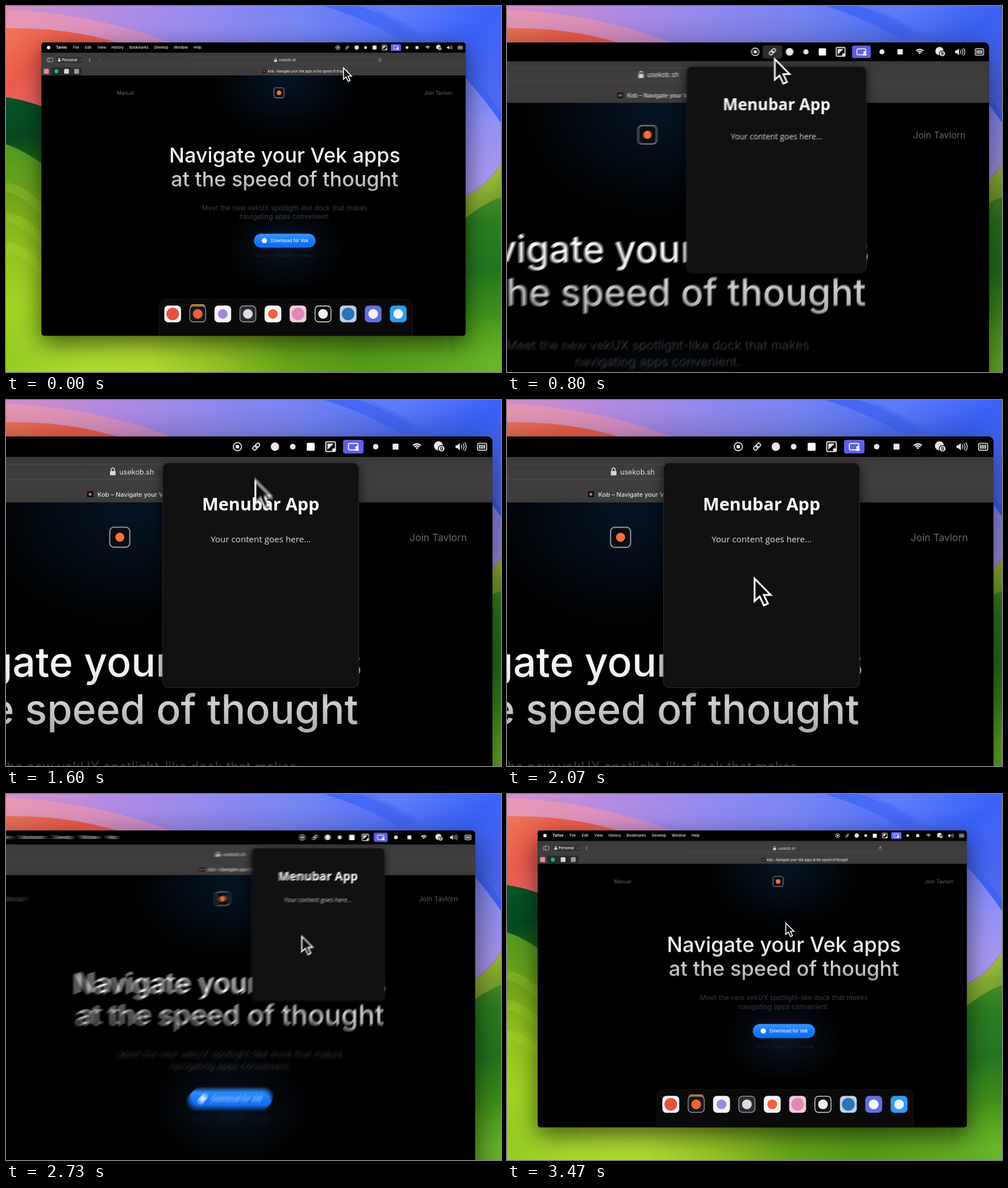
An HTML page with a canvas that plays this animation: 871x643 px, repeating every 3540 ms.

```html
<!DOCTYPE html>
<html lang="en">
<head>
<meta charset="utf-8">
<title>Menubar App</title>
<style>
html, body { margin: 0; width: 100%; height: 100%; overflow: hidden; background: #000; }
canvas { display: block; width: 871px; height: 643px; }
</style>
</head>
<body>
<canvas id="stage" width="871" height="643"></canvas>
<script>
const W = 871, H = 643, LOOP = 3540, FPS = 15;
const SHUTTER = 17, SAMPLES = 8;
const FOCUS = { x: 761, y: 64 };
const UI = 'Inter, sans-serif', POPUP = '"Open Sans", sans-serif';

const stage = document.getElementById('stage').getContext('2d');
const makeLayer = () => Object.assign(document.createElement('canvas'), { width: W, height: H }).getContext('2d');
const layer = makeLayer();
let g = makeLayer();

// ---------- drawing helpers ----------
function ramp(x0, y0, x1, y1, ...colors) {
  const grad = g.createLinearGradient(x0, y0, x1, y1);
  colors.forEach((c, i) => grad.addColorStop(i / (colors.length - 1), c));
  return grad;
}
function glow(x, y, r, color, squash = 1) {
  g.save();
  g.translate(x, y);
  g.scale(1, squash);
  const grad = g.createRadialGradient(0, 0, 0, 0, 0, r);
  grad.addColorStop(0, color);
  grad.addColorStop(1, color.slice(0, 7) + '00');
  g.fillStyle = grad;
  g.fillRect(-r, -r, 2 * r, 2 * r);
  g.restore();
}
function box(x, y, w, h, r, fill, stroke, line = 0.6) {
  g.beginPath();
  g.roundRect(x, y, w, h, r);
  if (fill) { g.fillStyle = fill; g.fill(); }
  if (stroke) { g.strokeStyle = stroke; g.lineWidth = line; g.stroke(); }
}
function dot(x, y, r, fill, stroke, line = 0.9) {
  g.beginPath();
  g.arc(x, y, r, 0, 7);
  if (fill) { g.fillStyle = fill; g.fill(); }
  if (stroke) { g.strokeStyle = stroke; g.lineWidth = line; g.stroke(); }
}
function shape(d, fill, stroke, line = 1) {
  const p = new Path2D(d);
  if (fill) { g.fillStyle = fill; g.fill(p); }
  if (stroke) { g.strokeStyle = stroke; g.lineWidth = line; g.stroke(p); }
}
function text(str, x, y, size, color, { weight = 400, align = 'left', family = UI } = {}) {
  g.font = `${weight} ${size}px ${family}`;
  g.textAlign = align;
  g.fillStyle = color;
  g.fillText(str, x, y);
}
function at(x, y, draw) {
  g.save();
  g.translate(x, y);
  draw();
  g.restore();
}

// ---------- motion ----------
// Monotone cubic through [time, value] keys.
function track(keys) {
  const last = keys.length - 1;
  const slope = i => (keys[i + 1][1] - keys[i][1]) / (keys[i + 1][0] - keys[i][0]);
  const tangent = i => {
    if (i === 0 || i === last) return 0;
    const a = slope(i - 1), b = slope(i);
    return a * b <= 0 ? 0 : 2 * a * b / (a + b);
  };
  return t => {
    if (t <= keys[0][0]) return keys[0][1];
    if (t >= keys[last][0]) return keys[last][1];
    const i = keys.findIndex(k => k[0] > t) - 1;
    const span = keys[i + 1][0] - keys[i][0], u = (t - keys[i][0]) / span, v = 1 - u;
    return v * v * (1 + 2 * u) * keys[i][1] + u * u * (3 - 2 * u) * keys[i + 1][1]
      + span * u * v * (v * tangent(i) - u * tangent(i + 1));
  };
}
const spring = u => u <= 0 ? 1 : (1 + u) * Math.exp(-u);
const release = track([[2399, 0], [2470, 0.46], [3000, 3.89], [3470, 6.45], [3540, 6.8]]);
const zoomAt = t => t < 2399 ? 2 - spring((t - 340) * 0.007) : 1 + spring(release(t));
const cursorX = track([[0, 593], [330, 599], [600, 602], [1470, 602], [1600, 599], [2000, 597.5],
  [2470, 597.5], [2740, 582], [3000, 524], [3260, 493]]);
const cursorY = track([[0, 107], [330, 94], [600, 78.2], [1470, 78.2], [1600, 101], [1900, 180],
  [2200, 189], [2470, 189], [3000, 215], [3300, 223]]);
const toolShift = track([[70, 0], [330, 6.5], [1000, 6.5], [1100, 0]]);
const dockDrop = track([[0, 1], [330, 0], [2900, 0], [3470, 0.5], [3540, 1]]);
const popupOpen = t => t >= 660 && t < 3200;

// ---------- wallpaper ----------
function paintWallpaper() {
  g.fillStyle = ramp(0, 30, W, 0, '#d58fca', '#b58be0', '#948af0', '#7584f5', '#4b70f8', '#3c62f4');
  g.fillRect(0, 0, W, H);
  shape('M620 0 Q760 45 871 205 V400 H780 V140 Q720 50 560 0Z',
    ramp(800, 40, 830, 290, '#4669f6', '#6f80f4', '#9190f4', '#a596ee'));
  shape('M640 0 H871 V190 Q800 70 640 0Z', ramp(700, 0, 860, 170, '#5e7dfa', '#3a62f8', '#5068ef'));
  shape('M0 7 Q170 12 330 80 L200 130 H0Z', ramp(0, 20, 300, 70, '#e898b4', '#dd92bf', '#c58bd5'));
  shape('M0 39 Q130 37 230 76 L150 220 H0Z', ramp(0, 40, 90, 175, '#f0755a', '#ec5c4b', '#ee6670'));

  g.fillStyle = ramp(0, 0, W, 0, '#93cb24', '#aadb2d', '#b0da32', '#92c225', '#66a618', '#559c16', '#5ea61e', '#69b62b');
  g.fillRect(0, 420, W, H - 420);
  shape('M0 160 Q45 166 110 196 V420 H0Z', ramp(0, 160, 30, 300, '#075428', '#064a20', '#286c12'));
  shape('M0 243 Q60 262 130 340 V643 H0Z',
    ramp(0, 245, 10, 620, '#4f9a20', '#71a51a', '#94c421', '#a2d426', '#9bd12600'));
  for (let i = 0; i < 3; i++) {
    const y = 318 + i * 52;
    shape(`M0 ${y} Q45 ${y + 8} 85 ${y + 70}`, null, '#bfe5402e', 16);
  }
  shape('M780 345 Q842 325 871 276 V643 H780Z',
    ramp(830, 300, 836, 625, '#5a962a', '#2b7d20', '#257520', '#41921b', '#56a01b00'));
  shape('M780 345 Q842 325 871 276 V336 Q840 345 780 395Z', ramp(820, 315, 850, 360, '#9cbc3a', '#6d9c2a'));
  shape('M790 341 Q842 325 871 276', null, '#c36bc0', 1.4);
  return g.canvas;
}
const wallpaper = paintWallpaper();
g = layer;

// ---------- window parts ----------
function menuBar(hot) {
  g.fillStyle = '#000';
  g.fillRect(62, 64, 748, 18);
  dot(75, 73, 3, '#eee');
  text('Tarivo', 88, 75.2, 6.3, '#fff', { weight: 700 });
  const menus = [['File', 118], ['Edit', 139], ['View', 161], ['History', 185.5], ['Bookmarks', 217],
    ['Develop', 261], ['Window', 295.5], ['Help', 330]];
  for (const [label, x] of menus) text(label, x, 75.2, 6.3, '#eee', { weight: 500 });

  const ink = '#e6e6e6';
  if (hot) box(591, 66.7, 19, 12.6, 2, '#2c2c2c');
  at(584, 73, () => { dot(0, 0, 3.6, null, ink); box(-1.5, -1.5, 3, 3, 0.5, ink); });
  at(600.5, 73, () => {
    g.rotate(-0.8);
    box(-3.6, -1.5, 4.2, 3, 1.5, null, ink, 0.9);
    box(-0.6, -1.5, 4.2, 3, 1.5, null, ink, 0.9);
  });
  dot(617, 73, 3.7, ink);
  dot(632.7, 73, 2.5, ink);
  box(645, 69.6, 7, 7, 1, '#fff');
  at(666, 73, () => {
    box(-4.2, -4.2, 8.4, 8.4, 1, null, ink, 1);
    shape('M-2.8 2.8V-2.8H2.8Z', ink);
    dot(3, 3, 1.6, ink);
  });
  box(677, 67, 18, 12, 2, '#5f60e6');
  at(686, 73, () => {
    box(-4.3, -2.8, 8.4, 5.6, 0.8, null, '#fff', 0.8);
    dot(3, 0.6, 1.2, '#fff');
    box(1.1, 1.8, 3.9, 1.8, 0.9, '#fff');
  });
  dot(705.7, 73, 2.4, ink);
  box(720.6, 70.4, 5.2, 5.2, 0.6, ink);
  at(742, 75.4, () => {
    for (const r of [1.2, 3, 4.8]) {
      g.beginPath();
      g.arc(0, 0, r, -2.36, -0.78);
      g.strokeStyle = ink;
      g.lineWidth = 1.2;
      g.stroke();
    }
  });
  dot(761, 72.3, 4, ink);
  dot(763.7, 74.7, 2.9, ink, '#000', 0.6);
  text('9', 763.7, 76.3, 4.5, '#111', { weight: 600, align: 'center' });
  shape('M776 71.7h1.6l2.2-2v6.6l-2.2-2h-1.6z', ink);
  shape('M781 71.3q1.2 1.7 0 3.4M782.5 70.2q2 2.8 0 5.6M784 69.2q2.8 3.8 0 7.6', null, ink, 0.7);
  box(795.4, 70, 8, 6.2, 1.2, null, ink, 0.8);
  for (let i = 0; i < 4; i++) box(796.6 + i * 1.5, 71.3, 1, 3.6, 0, ink);
}

function toolbar(shift) {
  g.fillStyle = ramp(0, 82, 0, 122, '#3b393a', '#403e3f', '#3c3a3b');
  g.fillRect(62, 82, 748, 40);
  shape('M320 88.5H662M320 101.7H662', null, '#4c4a4b', 0.6);
  at(shift, 0, () => {
    box(72.5, 91.4, 9.5, 6.6, 1.2, null, '#c8c8c8', 0.8);
    shape('M75.8 91.4V98', null, '#c8c8c8', 0.8);
    box(87.5, 88.2, 48, 13, 2.5, '#343233', '#5a5859');
    dot(93.7, 92.8, 1.4, '#eee');
    box(91.2, 94.6, 5, 2.8, 1.3, '#eee');
    text('Personal', 98.5, 97, 6.3, '#eee', { weight: 600 });
    shape('M129.3 94l1.7 1.6 1.7-1.6', null, '#999', 0.7);
    shape('M148.8 91.6l-3 3.2 3 3.2', null, '#ccc', 0.9);
    shape('M163.6 91.6l3 3.2-3 3.2', null, '#636162', 0.9);
  });
  box(79.8, 108, 53.4, 13.5, 0, '#2a292a');
  shape('M97.5 108v13.5M115.5 108v13.5', null, '#3c3a3b', 0.6);
  box(66.5, 110.2, 9, 9, 1.5, '#ee8c86');
  dot(88.7, 114.7, 3.6, '#22b486');
  box(102.3, 110.5, 8.4, 8.4, 1.5, '#d4d5dc');
  box(120, 110.5, 8.4, 8.4, 1.5, '#999ba3');

  box(471.8, 94.4, 5, 3.8, 0.7, '#d8d8d8');
  shape('M472.9 94.4v-1.2a1.4 1.5 0 0 1 2.8 0v1.2', null, '#d8d8d8', 0.8);
  text('usekob.sh', 480, 97.4, 6.3, '#e2e2e2');
  g.beginPath();
  g.arc(657.8, 95.3, 2.5, -0.6, 4.8);
  g.strokeStyle = '#bbb';
  g.lineWidth = 0.7;
  g.stroke();
  shape('M657.5 91.5l2.3 1.3-2.1 1.5z', '#bbb');
  box(451.2, 111.6, 6.3, 6.3, 1, '#141414', '#555', 0.4);
  dot(454.3, 114.8, 1.3, '#c86c4c');
  text('Kob – Navigate your Vek apps at the speed of thought', 460.8, 117, 5.5, '#e2e2e2', { weight: 500 });
}

function page() {
  g.fillStyle = '#000';
  g.fillRect(62, 122, 748, 460);
  g.save();
  g.beginPath();
  g.rect(62, 122, 748, 458);
  g.clip();
  glow(490, 135, 140, '#05142688', 0.75);
  glow(490, 130, 120, '#061628bb', 0.72);
  glow(490, 424, 105, '#0b1728dd', 0.75);
  g.restore();

  text('Manual', 195, 156, 8.7, '#67676b');
  text('Join Tavlorn', 786, 156, 8.7, '#67676b', { align: 'right' });
  box(471.6, 143.8, 17.6, 17.6, 3.6, '#0b0d10', '#8d8f92', 1.1);
  dot(480.4, 152.6, 4, '#f2713f');

  const mid = { align: 'center' };
  const title = { align: 'center', weight: 500 };
  const fade = ramp(0, 247, 0, 326, '#fff', '#eee', '#cdcdcd', '#a8a8a8');
  text('Navigate your Vek apps', 490.4, 275, 35.9, fade, title);
  text('at the speed of thought', 490.4, 316.5, 35.9, fade, title);
  text('Meet the new vekUX spotlight-like dock that makes', 490.4, 358.6, 12, '#383a41', mid);
  text('navigating apps convenient.', 490.4, 374.4, 12, '#383a41', mid);

  g.save();
  g.shadowColor = '#1677ff44';
  g.shadowBlur = 6;
  box(436.6, 400.2, 107.8, 24, 12, ramp(0, 400, 0, 424, '#3c96ff', '#1a7bfb', '#1069ee'));
  g.restore();
  box(437.1, 400.7, 106.8, 23, 11.5, null, '#4ba0ff88', 0.8);
  dot(454.6, 412.2, 4.6, '#fff');
  text('Download for Vek', 466, 415, 7.8, '#eaf3ff', { weight: 500 });
  text('v0.0.22  |  vekUX 12+  |  manual', 490.6, 441.4, 6.8, '#24272c', mid);
}

const WHITE = '#f4f4f5';
const apps = [
  [WHITE, '#e9503f'], ['#17181b', '#ef6232'], [WHITE, '#a487dd'], ['#2b2b32', '#dcdce2'], [WHITE, '#f0623e'],
  ['#f5c9de', '#e08bb5'], ['#0b0b0c', '#f0f0f0'], ['#b9d2e8', '#2d72b4'], ['#6470df', '#f4f5ff'], ['#2d9df6', '#f0f6fc']
];
function dock(drop) {
  at(-drop, 3 * drop, () => {
    box(270, 512, 446, 90, 13, '#0a0a0b', '#1b1b1d', 0.9);
    apps.forEach(([tile, mark], i) => {
      const x = 294.3 + i * 44.1, y = 538;
      if (i === 1) {
        box(x - 12, y - 17, 24, 8, 3, '#e5b13c');
        box(x - 13.5, y - 16, 27, 8, 4, '#e44e38');
      }
      box(x - 14.7, y - 14.7, 29.4, 29.4, 6.8, tile);
      if (i === 1 || i === 3 || i === 6) box(x - 14, y - 14, 28, 28, 6.2, null, i === 6 ? '#eee' : '#a5a1a0', 1.3);
      dot(x, y, i === 0 || i === 5 || i === 7 ? 11 : 8.5, mark);
    });
  });
}

function popup(scale) {
  g.save();
  g.shadowColor = '#000a';
  g.shadowBlur = 10 * scale;
  g.shadowOffsetY = 3 * scale;
  box(518, 87, 173, 198, 5.5, '#111112');
  g.restore();
  box(518.2, 87.2, 172.6, 197.6, 5.3, null, '#303032', 0.5);
  text('Menubar App', 604.5, 129, 15.3, '#fff', { weight: 700, align: 'center', family: POPUP });
  text('Your content goes here...', 604.5, 157, 7.6, '#dedede', { align: 'center', family: POPUP });
}

function cursor(x, y) {
  at(x, y, () => {
    g.lineJoin = 'miter';
    shape('M.8 1.8V21.6L5.3 17.5 9 25.4 12.5 23.8 8.9 16.2H15Z', '#0c0c0c', '#fff', 1.6);
  });
}

function scene(t) {
  const s = zoomAt(t), open = popupOpen(t), cx = cursorX(t), cy = cursorY(t);
  g.drawImage(wallpaper, 0, 0);
  g.save();
  g.translate(FOCUS.x, FOCUS.y);
  g.scale(s, s);
  g.translate(-FOCUS.x, -FOCUS.y);

  g.save();
  g.shadowColor = 'rgba(0,0,0,.6)';
  g.shadowBlur = 42 * s;
  g.shadowOffsetY = 13 * s;
  box(62.5, 64, 746, 515.3, 4.6, '#000');
  g.restore();

  g.save();
  g.beginPath();
  g.roundRect(62.5, 64, 746, 515.3, 4.6);
  g.clip();
  page();
  toolbar(toolShift(t));
  menuBar(open && cy < 90);
  dock(dockDrop(t));
  g.restore();

  if (open) popup(s);
  cursor(cx, cy);
  g.restore();
}

// Averages a few instants inside the shutter for motion blur.
function render(t) {
  for (let i = 0; i < SAMPLES; i++) {
    const offset = (i / (SAMPLES - 1) - 0.5) * SHUTTER;
    scene(Math.min(LOOP, Math.max(0, t + offset)));
    stage.globalAlpha = 1 / (i + 1);
    stage.drawImage(layer.canvas, 0, 0);
  }
}

let shown = -1;
function tick() {
  const t = performance.now() % LOOP;
  const step = Math.floor(t * FPS / 1000 + 0.06);
  if (step !== shown) {
    shown = step;
    render(step * 1000 / FPS);
  }
  requestAnimationFrame(tick);
}
tick();
</script>
</body>
</html>
```
